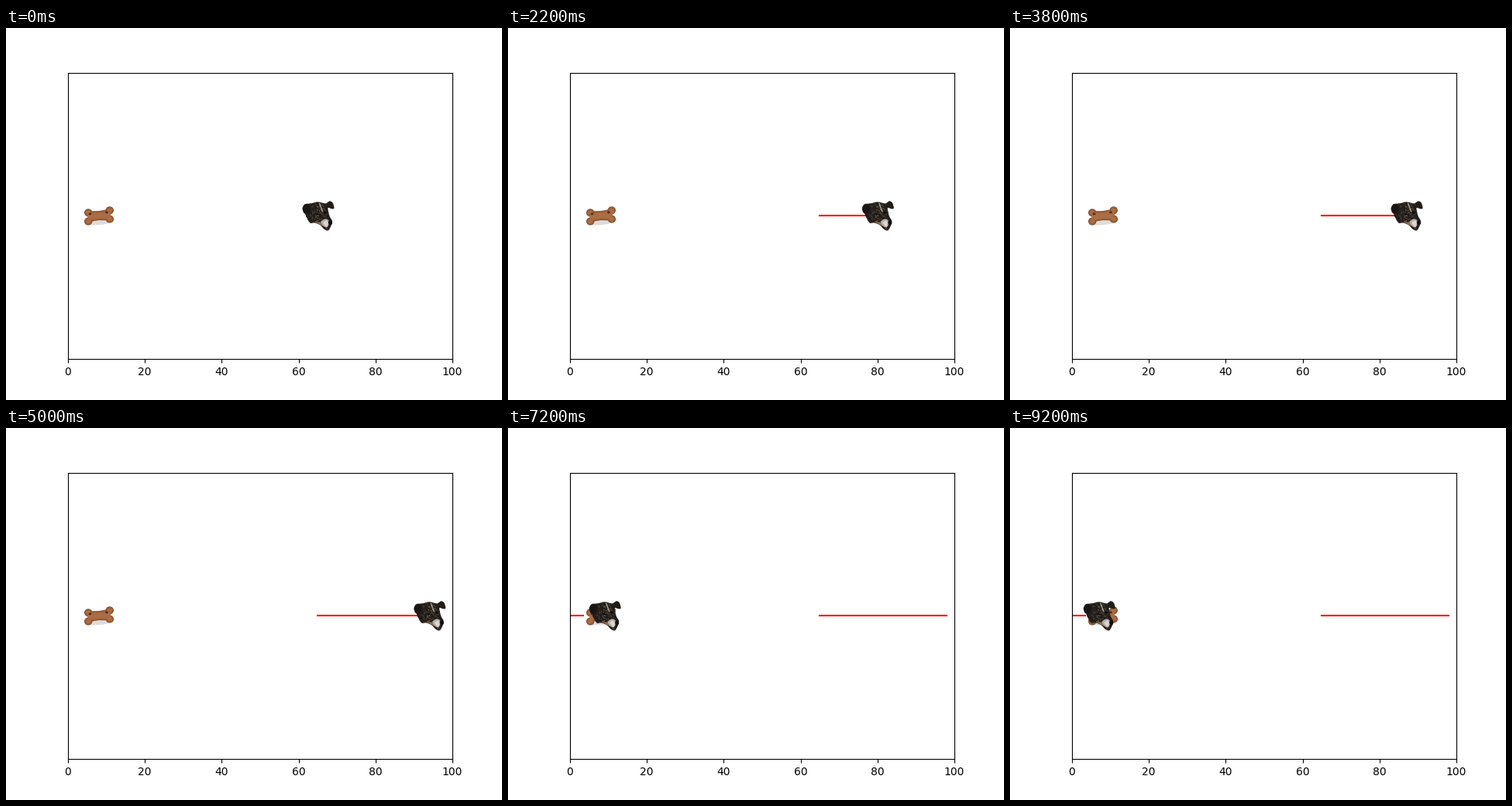
Write a matplotlib script that moves like this. It is 640x480 px and loops after 9600 ms.

```python
import numpy as np
import matplotlib.pyplot as plt
from matplotlib.animation import FuncAnimation
from matplotlib.collections import LineCollection
from matplotlib.patches import Ellipse, PathPatch, Polygon, Rectangle
from matplotlib.path import Path
from matplotlib.transforms import Affine2D

FRAMES, INTERVAL = 48, 200
START, BONE_X = 65, 8
AX_W, AX_H = 496, 369.6

# The dog walks right with short rests: (frame, place) at each change of pace.
PACE = [(0, START), (6, 75), (8, 78), (10, 78), (12, 82), (14, 82), (17, 86),
        (18, 86), (21, 91), (22, 91), (25, 94), (28, 98), (30, 102),
        (31, 102), (32, 104), (33, 104), (36, 109)]

frame = np.arange(FRAMES)
walk = np.floor(np.interp(frame, *zip(*PACE)) + 1e-6)
# Then it hops back and forth over the bone, four times and three times.
hops = np.clip(frame - 38, 0, 4) + np.clip(frame - 43, 0, 3)
walk -= 2 * (hops % 2)

pos = walk % 100
wrap = int(np.argmax(walk >= 100))
trail = np.insert(pos, wrap, np.nan)

fig, ax = plt.subplots(figsize=(6.4, 4.8), dpi=100)
ax.set_xlim(0, 100)
ax.set_ylim(-AX_H / 2, AX_H / 2)   # one unit of y is one pixel
ax.set_yticks([])
line, = ax.plot([], [], color="red", lw=1.5, zorder=2)


def place(shift, x):
    """Put a pixel-sized drawing (y down) at x on the axis."""
    return shift.clear().scale(100 / AX_W, -1).translate(x, 0)


def smooth(points):
    """Closed curve through the points."""
    p = np.array(points, float)
    nxt = np.roll(p, -1, 0)
    tan = (nxt - np.roll(p, 1, 0)) / 6
    curves = np.stack([p + tan, nxt - np.roll(tan, -1, 0), nxt], 1)
    verts = np.vstack([p[:1], curves.reshape(-1, 2)])
    return Path(verts, [Path.MOVETO] + [Path.CURVE4] * (3 * len(p)))


def pen(shift, z):
    """Return a function that adds patches, each above the one before."""
    trans = shift + ax.transData

    def add(patch, color):
        add.z += 0.01
        patch.set(transform=trans, zorder=add.z, fc=color, ec="none",
                  clip_on=False)
        return ax.add_patch(patch)

    add.z, add.trans = z, trans
    return add


def draw_bone():
    add = pen(place(Affine2D(), BONE_X), 3)
    add(Rectangle((-21.5, -15), 43, 30), "white")
    add(Ellipse((2, 7), 38, 9, angle=-6), "#e0dbd7")
    # The same bone, smaller and lighter each time
    for inset, color in ((0, "#7f4c2e"), (0.9, "#9b6039"), (2.4, "#aa6d44")):
        add(Polygon([(-14, -6 + inset), (0, -6.3 + inset), (15, -9 + inset),
                     (15, 6 - inset), (0, 5.6 - inset), (-14, 8 - inset)]), color)
        for side in (-1, 1):
            for end in (-1, 1):
                add(Ellipse((13.8 * side + 0.3, 5.6 * end - 1.5 * side),
                            10.4 - 2 * inset, 10 - 2 * inset), color)
    for side in (-1, 1):
        add(Ellipse((10.7 * side - 0.5, -3.5 - side), 3.6, 2.8), "#4b2a18")


def fur(add, head, n=260):
    """Short brindled strokes kept inside the head."""
    rng = np.random.default_rng(4)
    a = rng.uniform((-18, -18), (14, 10), (n, 2))
    turn = rng.uniform(0.6, 2.4, n)
    b = a + np.column_stack([np.cos(turn), np.sin(turn)]) * 1.6
    # Lighter towards the middle of the face
    shade = rng.uniform(0, 1, n) * np.exp(-((a[:, 0] - 1) / 12) ** 2)
    tones = np.outer(shade, (0.52, 0.43, 0.34)) + 0.06
    add.z += 0.01
    strokes = LineCollection(np.stack([a, b], 1), colors=tones, linewidths=0.7,
                             transform=add.trans, zorder=add.z)
    ax.add_collection(strokes, autolim=False)
    strokes.set_clip_path(head)


def draw_dog(shift):
    add = pen(shift, 4)
    head = add(PathPatch(smooth(
        [(-20, -9), (-17, -15), (-9, -16), (0, -18), (10, -16), (15, -19),
         (19, -17), (21, -10), (18, -9), (13, -10), (15, 0), (18.5, 7),
         (16.5, 14), (13, 19), (8, 17), (3, 12), (-4, 9), (-10, 9),
         (-14, 3), (-17, -4)])), "#231e1b")
    fur(add, head)
    add(Ellipse((-14.5, -8.5), 9, 12, angle=25), "#191513")   # ears
    add(Ellipse((17.2, -14), 5, 9, angle=-30), "#221c19")
    add(Polygon([(1, -17), (3, -16), (7, -5), (5.5, -5)]), "#a8a097")
    add(Polygon([(-3, 8), (3, 8), (8, 14), (3, 11.5)]), "#8f7156")
    for x, y in ((-1, -2.5), (9.5, -4)):
        add(Ellipse((x, y), 4, 2.4, angle=15), "#0e0b0a")
    add(PathPatch(smooth([(4, 8), (9, 4), (14, 6), (14, 11), (11.5, 15),
                          (7, 13)])), "#b5ada6")
    add(PathPatch(smooth([(7, 9), (11, 6), (13, 10), (11, 14)])), "#dcd6d1")
    add(Ellipse((11.8, 17), 5, 2.4, angle=20), "#4d2d2a")
    add(Ellipse((16, 8.8), 5, 6, angle=-15), "#13100f")


def update(k):
    place(dog, pos[k])
    xs = trail[:k + 1 + (k >= wrap)]
    line.set_data(xs, np.zeros(len(xs)))
    return [line]


dog = place(Affine2D(), START)
draw_bone()
draw_dog(dog)

anim = FuncAnimation(fig, update, frames=FRAMES, interval=INTERVAL,
                     init_func=lambda: update(0), repeat=True, repeat_delay=0)
plt.show()
```
